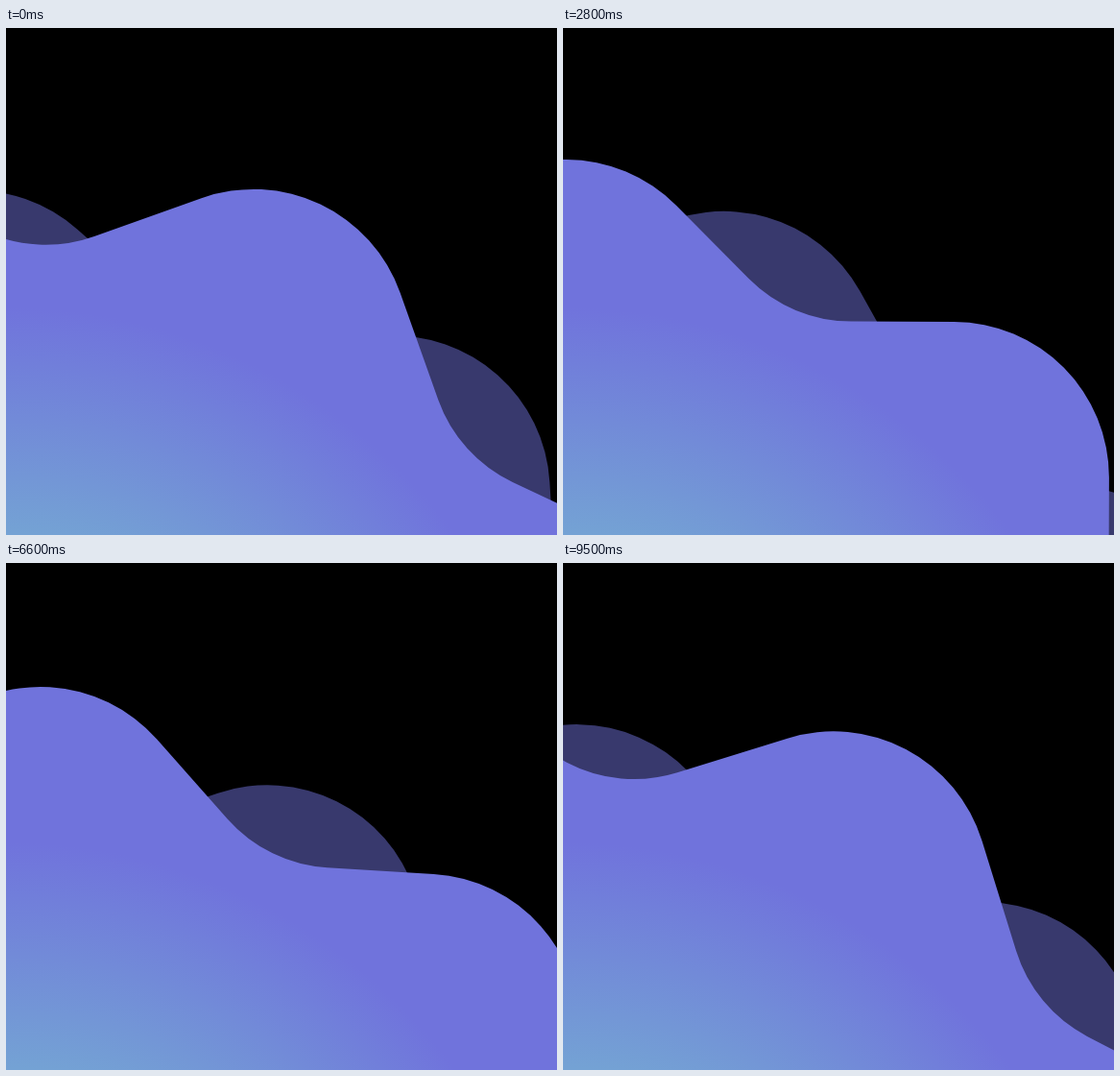
An HTML page with a canvas that plays this animation: 574 px wide and 528 px high, repeating every 9.6 s.

```html
<!DOCTYPE html>
<html lang="en">
<head>
<meta charset="utf-8">
<title>Rotating blobs</title>
<style>
  html, body { margin: 0; width: 100%; height: 100%; overflow: hidden; background: #000; }
  canvas { display: block; }
</style>
</head>
<body>
<canvas id="stage" width="574" height="528"></canvas>
<script>
const ctx = document.getElementById('stage').getContext('2d');
const LOOP = 9600, STEP = 100, CYCLE = 10;
const LOBES = 8, BUMP = 162, DIP = 151;
const CX = 1, CY = 871;
const rad = deg => deg * Math.PI / 180;

// Front blob: seconds, lobe distance from the centre, lobe angle from vertical
const poses = [
  [0, 599, 25.4],
  [1.1, 588, 16.9],
  [2.8, 572, 0.2],
  [4.1, 561, -13.8],
  [5.7, 573, -31.7],
  [7.5, 589, -50.2],
  [9.5, 603, -62.25]
];

// Pose by index, continued beyond the cycle (a quarter turn each time)
function poseAt(i) {
  const n = poses.length, turn = Math.floor(i / n);
  const [t, reach, angle] = poses[i - turn * n];
  return [t + turn * CYCLE, reach, angle - turn * 90];
}

// Smooth cubic through the poses
function frontPose(t) {
  let i = poses.length - 1;
  while (poses[i][0] > t) i--;
  const [p, q, r, s] = [-1, 0, 1, 2].map(k => poseAt(i + k));
  const span = r[0] - q[0], u = (t - q[0]) / span;
  const u2 = u * u, u3 = u2 * u;
  return [1, 2].map(k => {
    const m0 = (r[k] - p[k]) / (r[0] - p[0]) * span;
    const m1 = (s[k] - q[k]) / (s[0] - q[0]) * span;
    return (2 * u3 - 3 * u2 + 1) * q[k] + (u3 - 2 * u2 + u) * m0
      + (3 * u2 - 2 * u3) * r[k] + (u3 - u2) * m1;
  });
}

// Round lobes joined by straight flanks and round hollows
function blob(x, y, reach, angle) {
  const half = Math.PI / LOBES, quarter = Math.PI / 4;
  const hollow = (BUMP + reach * Math.cos(quarter) + DIP) / Math.cos(half);
  ctx.beginPath();
  for (let i = 0; i < LOBES; i++) {
    const a = rad(angle - 90) + i * 2 * half, b = a + half;
    ctx.arc(x + reach * Math.cos(a), y + reach * Math.sin(a), BUMP, a - quarter, a + quarter);
    ctx.arc(x + hollow * Math.cos(b), y + hollow * Math.sin(b), DIP,
      b + Math.PI + half, b + Math.PI - half, true);
  }
  ctx.closePath();
  ctx.fill();
}

const glow = ctx.createRadialGradient(CX, CY, 345, CX, CY, 580);
glow.addColorStop(0, 'rgb(116, 162, 212)');
glow.addColorStop(1, 'rgb(112, 115, 220)');

function draw(t) {
  ctx.fillStyle = '#000';
  ctx.fillRect(0, 0, 574, 528);

  ctx.fillStyle = 'rgb(56, 57, 109)';
  blob(3, 935, 605, 41.1 - 9 * t + 0.5 * Math.cos(2 * Math.PI * t / CYCLE));

  ctx.fillStyle = glow;
  blob(CX, CY, ...frontPose(t));
}

const start = performance.now();
function tick() {
  const ms = (performance.now() - start) % LOOP;
  draw(Math.floor(ms / STEP) * STEP / 1000);
  requestAnimationFrame(tick);
}
tick();
</script>
</body>
</html>
```
